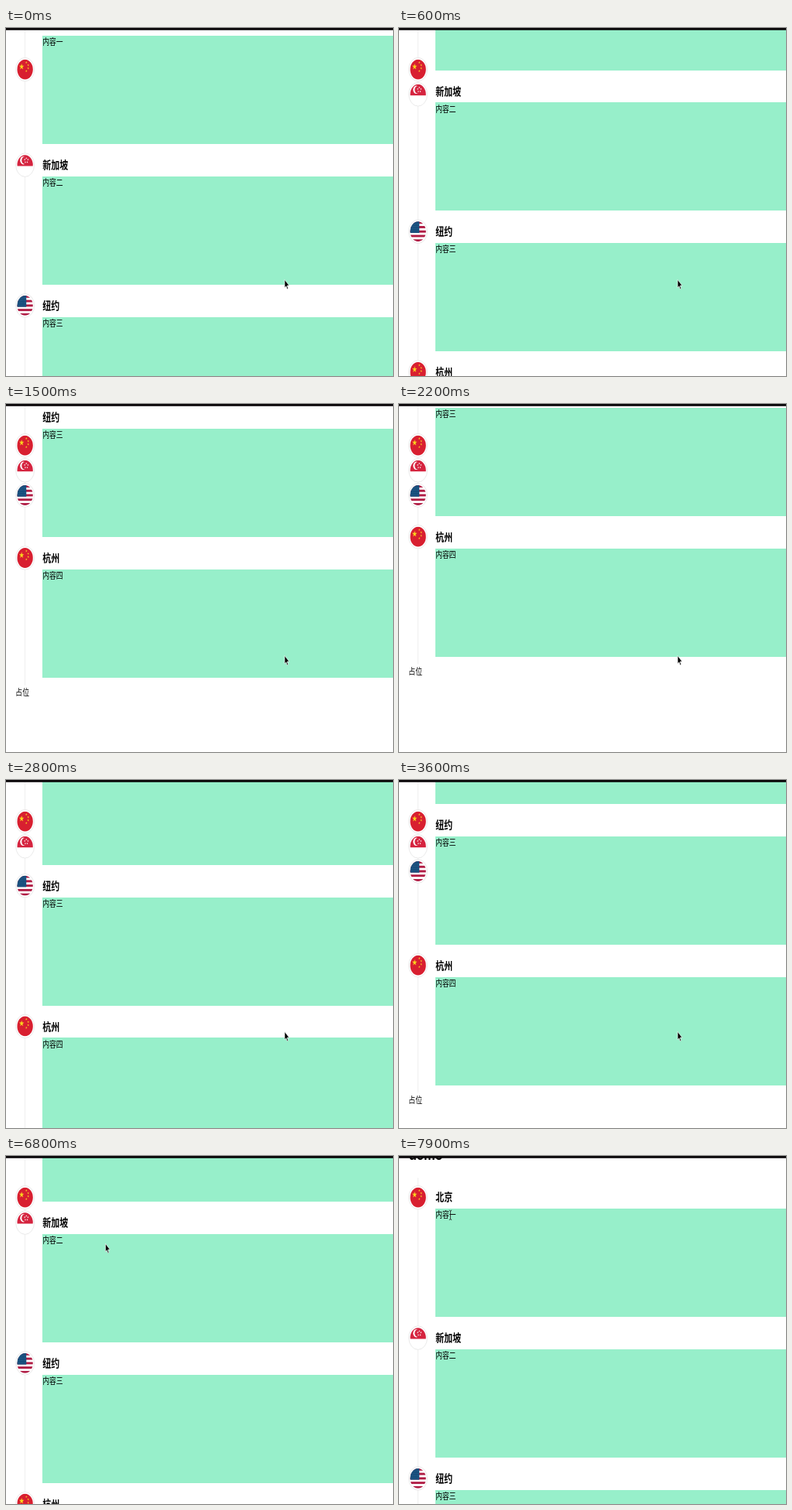
Animation of 500x450 px, one loop 8 s. Source, as an HTML page:

```html
<!DOCTYPE html>
<html lang="zh">
<head>
<meta charset="utf-8">
<title>Sticky timeline</title>
<style>
  html, body { margin: 0; width: 100%; height: 100%; overflow: hidden; background: #fff; }
  svg { display: block; width: 500px; height: 450px; }
  text { font-family: "Noto Sans CJK SC", "Noto Sans CJK", "Noto Sans", sans-serif; font-size: 16px; font-weight: 500; fill: #000; }
  .title { font-size: 20px; font-weight: 700; }
  .head { font: 700 30px "Liberation Sans", Arial, sans-serif; }
  .box { shape-rendering: crispEdges; }
</style>
</head>
<body>
<svg viewBox="0 0 500 450">
  <defs><clipPath id="disc"><circle r="18.5"/></clipPath></defs>
  <rect width="500" height="450" fill="#fff"/>
  <g id="page"></g>
  <g id="flags"></g>
  <rect width="500" height="2.8" fill="#0b080a"/>
  <g id="cursor">
    <path id="arrow" d="M0 0V15L3.4 12L5.8 17.5L8.2 16.5L6 11H10.6Z" fill="#000" stroke="#fff"/>
    <path id="beam" d="M-3 -9Q0 -9 0 -6V6Q0 9 -3 9M3 -9Q0 -9 0 -6M0 6Q0 9 3 9" fill="none" stroke="#222" stroke-width="1.3"/>
  </g>
</svg>
<script>
const LOOP = 8000, STEP = 100;
const SX = .55, SY = .7;          // the page is shown squeezed
const PITCH = 259.7, BOX = 200;   // section layout in page units
const $ = id => document.getElementById(id);
const squeeze = (x, y) => `translate(${x} ${y}) scale(${SX} ${SY})`;
const rect = (x, y, w, h, fill) => `<rect x="${x}" y="${y}" width="${w}" height="${h}" fill="${fill}"/>`;
const dot = (x, y, r, fill) => `<circle cx="${x}" cy="${y}" r="${r}" fill="${fill}"/>`;
const repeat = (n, f) => Array.from({ length: n }, (_, i) => f(i)).join('');
const field = fill => rect(-19, -19, 38, 38, fill);

function star(x, y, r, fill) {
  const points = repeat(10, i => {
    const a = i * Math.PI / 5 - Math.PI / 2, q = i % 2 ? r * .4 : r;
    return `${x + q * Math.cos(a)},${y + q * Math.sin(a)} `;
  });
  return `<polygon points="${points}" fill="${fill}"/>`;
}

function china() {
  // small stars on an arc around the big one
  return field('#d81f30') + star(-8, -5, 6, '#fbd51c') + repeat(4, i => {
    const a = (i - 1.5) * .6;
    return star(-5 + 13 * Math.cos(a), -5 + 10 * Math.sin(a), 2.4, '#f6c623');
  });
}
function singapore() {
  return field('#fff') + rect(-19, -19, 38, 21, '#d5243f') +
    dot(-4, -8.5, 7.5, '#fff') + dot(-.8, -8.5, 7, '#d5243f') +
    repeat(5, i => {
      const a = i * Math.PI * .4 - Math.PI / 2;
      return star(3 + 4 * Math.cos(a), -8.5 + 4 * Math.sin(a), 2, '#fff');
    });
}
function usa() {
  const h = 37 / 9;
  return field('#fff') +
    repeat(5, i => rect(-19, -18.5 + i * 2 * h, 38, h, '#b01c44')) +
    rect(-19, -19, 22, 19.5 + h / 2, '#174e7c') +
    repeat(16, i => dot(-14 + i % 4 * 4.6, -14 + (i >> 2) * 4.4, .6, '#5f86ab'));
}

const sections = [
  ['北京', '内容一', china], ['新加坡', '内容二', singapore],
  ['纽约', '内容三', usa], ['杭州', '内容四', china]
];

$('page').innerHTML =
  '<text class="head" x="23" y="-91">demo</text>' +
  rect(43.8, -57, 1.5, 3 * PITCH + BOX + 71, '#ececec') +
  sections.map(([title, body], i) => `<g transform="translate(0 ${i * PITCH})">
    <text class="title" x="86" y="-14">${title}</text>
    <g class="box">${rect(86, 0, 830, BOX, '#97efca')}</g>
    <text x="86" y="17.5">${body}</text></g>`).join('') +
  `<text x="22.5" y="${3 * PITCH + 233}">占位</text>`;

$('flags').innerHTML = sections.map(([, , flag]) =>
  `<g><circle r="21.8" fill="#fff" stroke="#e6e6e6" stroke-width="1.4"/><g clip-path="url(#disc)">${flag()}</g></g>`).join('');
const flags = [...$('flags').children];

// eased move by d between two times
function glide(t, from, to, d) {
  const u = Math.min(1, Math.max(0, (t - from) / (to - from)));
  return d * u * u * (3 - 2 * u);
}

const scrollAt = t => 10.2 + glide(t, 0, 1800, -369) + glide(t, 2400, 3050, 219) +
  glide(t, 3050, 3730, -167) + glide(t, 5200, 6100, 226) + glide(t, 7600, 7900, 149);

// from the content to the stuck flags, onto the text, back to the flags, to the first line
function pointerAt(t) {
  const move = (from, to, dx, dy) => [glide(t, from, to, dx), glide(t, from, to, dy)];
  return [
    [360, 325.4], move(3600, 4200, -330, -221), move(4400, 4900, -4, -25), move(5200, 6100, -6, 8),
    move(6100, 6500, 108.5, 26), move(6800, 7300, -108, -73), move(7300, 7800, 46, 36)
  ].reduce(([x, y], [dx, dy]) => [x + dx, y + dy]);
}

function draw(time) {
  const t = Math.floor(time % LOOP / STEP) * STEP;
  const top = scrollAt(t);
  $('page').setAttribute('transform', squeeze(0, top));
  flags.forEach((flag, i) => {
    const y = Math.max(53.6 + 32.2 * i, top + i * PITCH * SY - 14.9);
    flag.setAttribute('transform', squeeze(24.6, y));
  });
  const overText = t >= 7900;
  $('cursor').setAttribute('transform', squeeze(...pointerAt(t)));
  $('arrow').style.display = overText ? 'none' : '';
  $('beam').style.display = overText ? '' : 'none';
}

const start = performance.now();
function tick() {
  draw(performance.now() - start);
  requestAnimationFrame(tick);
}
tick();
</script>
</body>
</html>
```
